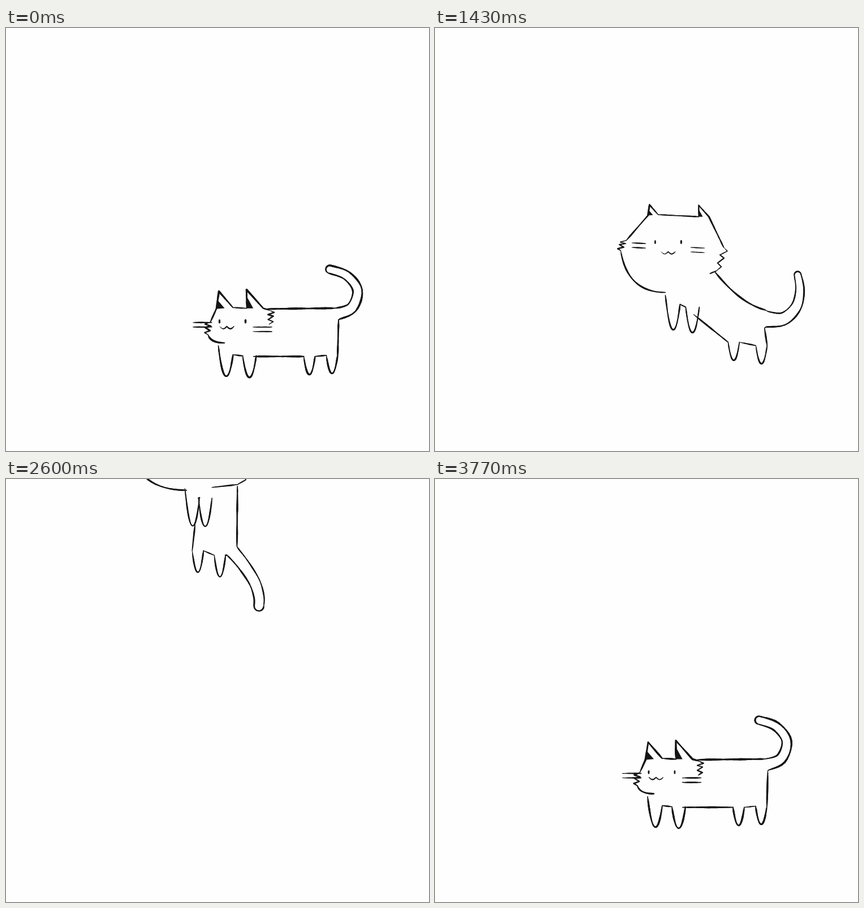
An HTML page with a canvas for the animation above (3900 ms loop, 748x748 px).

```html
<!DOCTYPE html>
<html lang="en">
<head>
<meta charset="utf-8">
<title>Floating cat</title>
<style>
html, body { margin: 0; width: 100%; height: 100%; overflow: hidden; background: #fefefe; }
canvas { display: block; width: 748px; height: 748px; }
</style>
</head>
<body>
<canvas id="stage" width="748" height="748"></canvas>
<script>
const ctx = document.getElementById('stage').getContext('2d');
const STEP = 130, COUNT = 30, INK = '#151515';

// A pose is a rig: arrays hold x, y points, plain numbers hold sizes.
const standHead = {
  ears: [377,466, 426,463], ear: 31, cheekL: [362,520], jawL: [358,543], chin: [387,557],
  cheekR: [466,499], jawR: [466,524], throat: 0,
  eyes: [401,519], mouthX: -10, mouthY: 11, whisker: 53, whiskerLen: 33, tilt: 0
};
const puffHead = {
  ears: [360,427, 435,423], ear: 22, cheekL: [341,482], jawL: [333,518], chin: [393,553],
  cheekR: [490,470], jawR: [476,521], throat: 0,
  eyes: [399,492], mouthX: -3, mouthY: 13, whisker: 48, whiskerLen: 24, tilt: 0
};
const liftHead = {
  ears: [379,313, 466,314], ear: 19, cheekL: [338,376], jawL: [328,394], chin: [407,468],
  cheekR: [510,388], jawR: [497,430], throat: 0.12,
  eyes: [412,379], mouthX: 0, mouthY: 19, whisker: 52, whiskerLen: 24, tilt: 0.05
};
const floatHead = {
  ears: [286,180, 424,177], ear: 25, cheekL: [250,249], jawL: [246,287], chin: [346,361],
  cheekR: [483,303], jawR: [436,351], throat: 0.5,
  eyes: [356,265], mouthX: -2, mouthY: 20, whisker: 60, whiskerLen: 40, tilt: 0.2
};
const standBody = {
  feet: [390,616, 431,618, 537,613, 577,611], foreLeg: 38, hindLeg: 32, belly: [438,581],
  back: [463,497], sag: 0, tail: [585,506, 612,495, 622,464, 603,438, 573,427],
  root: 11, tip: 7, ink: 3.5, legs: 1
};
const liftBody = {
  feet: [421,534, 455,539, 528,588, 577,594], foreLeg: 45, hindLeg: 32, belly: [457,507],
  back: [495,432], sag: 22, tail: [583,515, 615,515, 638,494, 645,464, 641,437],
  root: 16, tip: 6, ink: 2.9, legs: 1
};
const floatBody = {
  feet: [357,424, 379,425, 366,506, 405,514], foreLeg: 50, hindLeg: 38, belly: [361,422],
  back: [436,354], sag: 0, tail: [426,468, 446,492, 466,523, 474,549, 474,566],
  root: 12, tip: 8.5, ink: 2.9, legs: 1
};

const lerp = (a, b, t) => a + (b - a) * t;
const between = (p, q, t) => p.map((v, i) => lerp(v, q[i], t));
const mapPose = (pose, fn) => Object.fromEntries(Object.entries(pose).map(([k, v]) => [k, fn(v, k)]));
const move = (list, dx, dy) => list.map((v, i) => v + (i % 2 ? dy : dx));
const shift = (pose, dx, dy) => mapPose(pose, v => Array.isArray(v) ? move(v, dx, dy) : v);
const mix = (a, b, t) => mapPose(a, (v, k) => Array.isArray(v) ? between(v, b[k], t) : lerp(v, b[k], t));

const stand = { ...standHead, ...standBody };
const puff = { ...puffHead, ...standBody, back: [491,495], ink: 3 };
const lift = { ...liftHead, ...liftBody };
const float = { ...floatHead, ...floatBody };
const swell = { ...mix(puff, lift, 0.5), ...shift(liftHead, -26, 62) };
const dropTail = [585,564, 604,557, 622,541, 637,524, 650,511];
const crouch = {
  ...shift(stand, 0, 54.5), feet: stand.feet, belly: stand.belly, tail: dropTail, tip: 9, legs: 0
};
const fall = { ...stand, tail: move(dropTail, 0, -55) };

const keys = [
  [0, stand], [5, stand], [7, puff], [10, swell], [11, lift], [16, float],
  [20, shift(float, -27, -341)], [22, shift(float, -40, -511)],
  [23, shift(fall, 0, -260)], [24, shift(fall, 0, 117)],
  [25, crouch], [26, crouch], [29, stand]
];

function poseAt(f) {
  const i = Math.max(1, keys.findIndex(k => k[0] >= f));
  const [f0, a] = keys[i - 1], [f1, b] = keys[i];
  return mix(a, b, (f - f0) / (f1 - f0));
}

const rand = n => { const s = Math.sin(n * 12.9898) * 43758.5453; return s - Math.floor(s); };
const plot = (n, fn) => Array.from({ length: n + 1 }, (_, i) => fn(i / n));
const point = (list, i) => list.slice(i * 2, i * 2 + 2);
const bend = (a, c, b) => plot(16, t => between(between(a, c, t), between(c, b, t), t));

// Uniform cubic B-spline segments would miss the points, so use Catmull-Rom.
function spline(pts, t) {
  const last = pts.length - 1, i = Math.min(last - 1, Math.floor(t * last)), u = t * last - i;
  const [p, q, r, s] = [-1, 0, 1, 2].map(d => pts[Math.max(0, Math.min(last, i + d))]);
  return [0, 1].map(c => q[c] + u / 2 * (r[c] - p[c]
    + u * (2 * p[c] - 5 * q[c] + 4 * r[c] - s[c] + u * (3 * (q[c] - r[c]) + s[c] - p[c]))));
}

let seed = 0;

// Brush line with tapered ends and slightly uneven weight.
function pen(pts, width) {
  seed += 7;
  const line = [pts[0]];
  for (let i = 1; i < pts.length; i++) {
    const [a, b] = [pts[i - 1], pts[i]];
    const n = Math.ceil(Math.hypot(b[0] - a[0], b[1] - a[1]) / 3);
    for (let k = 1; k <= n; k++) line.push(between(a, b, k / n));
  }
  const last = line.length - 1;
  for (let i = 0; i < last; i++) {
    const taper = last < 5 ? 1 : Math.min(1, 0.55 + Math.min(i, last - i) / 7);
    ctx.lineWidth = width * taper * (0.86 + 0.16 * Math.sin(i * 0.3 + seed) + 0.14 * (rand(seed + i) - 0.5));
    ctx.beginPath();
    ctx.moveTo(...line[i]);
    ctx.lineTo(...line[i + 1]);
    ctx.stroke();
  }
}

function fill(pts) {
  ctx.beginPath();
  pts.forEach(p => ctx.lineTo(...p));
  ctx.fill();
}

function fur(a, b, side, width) {
  pen(plot(6, t => {
    const i = Math.round(t * 6), [x, y] = between(a, b, t);
    return i % 6 ? [x + side * (i % 2 ? 5 + 4 * rand(i) : -2), y + 2 * rand(i + 9) - 2] : [x, y];
  }), width);
}

function drawHead(p) {
  const w = p.ink, tipL = point(p.ears, 0), tipR = point(p.ears, 1);
  const base = (tip, x, y) => [tip[0] + x * p.ear, tip[1] + y * p.ear];
  const outL = base(tipL, -0.15, 1), inL = base(tipL, 0.8, 0.92);
  const inR = base(tipR, 0, 1.06), outR = base(tipR, 0.95, 1.06);
  pen([p.cheekL, outL, tipL, inL], w);
  pen([inL, inR], w * 0.85);
  pen([inR, tipR, outR, p.cheekR], w);
  fill([outL, between(outL, tipL, 0.5), between(outL, inL, 0.5)]);
  fill([inR, between(inR, tipR, 0.65), between(inR, outR, 0.4)]);
  fur(p.cheekL, p.jawL, -1, w * 0.8);
  fur(p.cheekR, p.jawR, 1, w * 0.7);
  pen(bend(p.jawL, [lerp(p.jawL[0], p.chin[0], 0.15), p.chin[1]], p.chin), w);
  if (p.throat > 0.02) pen([p.jawR, between(p.jawR, p.chin, p.throat)], w * 0.9);

  const [ex, ey] = p.eyes;
  for (const side of [-1, 1]) {
    const x = ex + side * 23;
    pen([[x, ey - 2], [x, ey + 2]], w);
    const wx = ex + side * p.whisker, dx = p.whiskerLen / 2;
    for (const gap of [-4, 4]) {
      const wy = ey + 10 + side * 4 + gap;
      pen([[wx - dx, wy - dx * p.tilt], [wx + dx, wy + dx * p.tilt]], w * 0.75);
    }
  }
  pen(plot(16, t => [ex + p.mouthX + 25 * (t - 0.5), ey + p.mouthY - 2 + 4 * Math.abs(Math.sin(t * Math.PI * 2))]), w * 0.6);
}

function drawTail(p) {
  const mid = plot(4, t => point(p.tail, t * 4)), sides = [[], []];
  let heading;
  for (const t of plot(24, u => u)) {
    const [x, y] = spline(mid, t), a = spline(mid, Math.max(0, t - 0.02)), b = spline(mid, Math.min(1, t + 0.02));
    heading = Math.atan2(b[1] - a[1], b[0] - a[0]);
    const half = lerp(p.root, p.tip, Math.sqrt(t));
    sides.forEach((s, i) => {
      const turn = heading + (i - 0.5) * Math.PI;
      s.push([x + half * Math.cos(turn), y + half * Math.sin(turn)]);
    });
  }
  const cap = plot(8, t => {
    const turn = heading + (0.5 - t) * Math.PI;
    return [mid[4][0] + p.tip * Math.cos(turn), mid[4][1] + p.tip * Math.sin(turn)];
  });
  pen(sides[0], p.ink * 0.85);
  pen([...sides[1], ...cap], p.ink);
  return sides.map(s => s[0]);
}

function drawBody(p) {
  const w = p.ink, [top, under] = drawTail(p);
  const [cx, cy] = between(p.back, top, 0.5);
  pen(bend(p.back, [cx, cy + p.sag], top), w * 1.1);
  const feet = plot(3, t => point(p.feet, t * 3));
  if (p.legs < 0.5) {
    pen([under, [under[0], feet[3][1] + 4]], w);
    return;
  }
  const hips = feet.map(([x, y], i) => {
    const half = i < 2 ? 12 : 10, len = i < 2 ? p.foreLeg : p.hindLeg;
    const leg = plot(14, t => {
      const u = t * 2 - 1;
      return [x + half * u, y - len * Math.abs(u) ** 2.2];
    });
    if (!i) leg.unshift([x - half - 2, y - len - 16]);
    pen(leg, w * 0.95);
    return [[x - half, y - len], [x + half, y - len]];
  });
  pen([hips[0][1], hips[1][0]], w * 0.9);
  pen([p.belly, hips[2][0]], w);
  pen([hips[2][1], hips[3][0]], w * 0.8);
  pen([under, hips[3][1]], w);
}

function draw(f) {
  ctx.fillStyle = '#fefefe';
  ctx.fillRect(0, 0, 748, 748);
  ctx.fillStyle = ctx.strokeStyle = INK;
  ctx.lineCap = ctx.lineJoin = 'round';
  seed = f * 17;
  ctx.save();
  ctx.translate(rand(f) - 0.5, rand(f + 50) - 0.5);
  const pose = poseAt(f);
  drawBody(pose);
  drawHead(pose);
  ctx.restore();
}

let start, shown = -1;
function tick(now) {
  start ??= now;
  const f = Math.floor((now - start) / STEP) % COUNT;
  if (f !== shown) draw(shown = f);
  requestAnimationFrame(tick);
}
draw(0);
requestAnimationFrame(tick);
</script>
</body>
</html>
```
